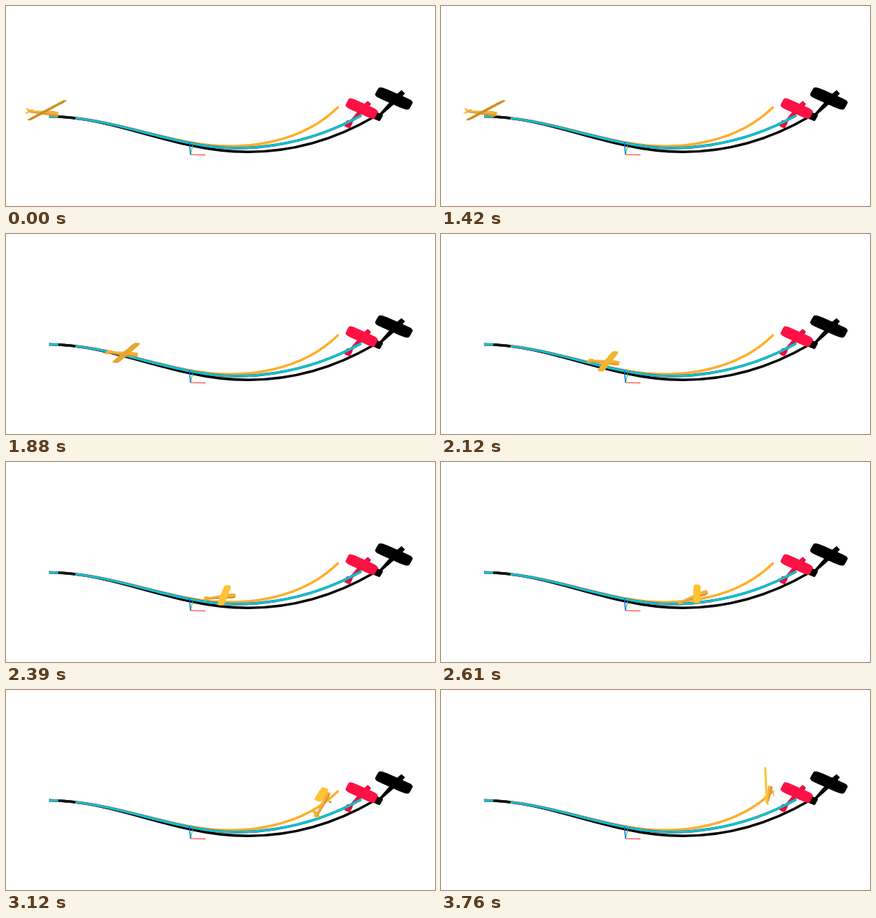
Recreate the animation shown at these times as an HTML page with a canvas. Size 600 px wide and 280 px high, loop 4.51 s.

```html
<!DOCTYPE html>
<html lang="en">
<head>
<meta charset="utf-8">
<style>
  html, body { margin: 0; width: 100%; height: 100%; overflow: hidden; background: #fff; }
  canvas { display: block; }
</style>
</head>
<body>
<canvas id="stage" width="600" height="280"></canvas>
<script>
const ctx = document.getElementById('stage').getContext('2d');
const LOOP = 4510, START = 1420, FLIGHT = 2130;

const blackTrack = new Path2D('M60 154.5 C130 155 190 181 258 195 C345 214.5 432 203.5 515 155');
const cyanTrack = new Path2D('M60 154.5 C130 155 190 179 258 192 C332 208 420 196 497 153');
const orangeTrack = new Path2D('M60 154.5 C130 155 190 178 258 191 C340 206 418 188 465 141');

// Screen vectors: wing centre, half span, half chord, tail to cabin, cabin to wing
const blackPlane = {
  center: [542.5, 129.5], span: [-24, -10.5], chord: [4, -7], body: [24, -24], rise: [-2, -1.5],
  girth: 4, wing: '#000', skin: '#000', shade: '#000'
};
const redPlane = {
  center: [497.5, 143.5], span: [-20.5, -9.3], chord: [3.5, -6.8], body: [20, -21], rise: [-1.5, -1],
  girth: 3.8, wing: '#ff1044', skin: '#f01040', shade: '#c80e3a'
};

function line(path, color, width = 3.4) {
  ctx.strokeStyle = color;
  ctx.lineWidth = width;
  ctx.stroke(path);
}

function fill(points, color) {
  ctx.beginPath();
  points.forEach(p => ctx.lineTo(...p));
  ctx.fillStyle = color;
  ctx.fill();
}

function drawPlane({ center, span, chord, body, rise, girth, wing, skin, shade }) {
  const at = (f, s, u, k = 0) => center.map((c, i) =>
    c + f * body[i] + s * span[i] + u * rise[i] + k * chord[i]);
  const length = Math.hypot(...body);
  const side = (f, w) => {
    const [x, y] = at(f, 0, -1);
    return [x - body[1] / length * w, y + body[0] / length * w];
  };
  // Rounded panel: a superellipse across span and chord
  const panel = (f, u, s, k, color) => {
    const round = v => Math.sign(v) * Math.abs(v) ** .35;
    const points = Array.from({ length: 48 }, (_, i) => {
      const a = i / 24 * Math.PI;
      return at(f, s * round(Math.cos(a)), u, k * round(Math.sin(a)));
    });
    fill(points, color);
  };

  panel(.2, -2, .13, .35, shade);
  panel(-1, -1, .2, .65, skin);
  fill([at(-1.08, 0, -1), at(-1.06, 0, .3), at(-.75, 0, -1)], skin);
  const profile = [[-1, 1.4], [-.2, girth * .8], [.2, girth], [.46, girth * .8]];
  const left = profile.map(([f, w]) => side(f, w));
  const right = profile.map(([f, w]) => side(f, -w)).reverse();
  fill([...left, ...right], skin);
  fill([...left, side(.4, girth * .3), side(-1, .4)], shade);
  panel(0, 0, 1, 1, wing);
}

function flyingPlane(t) {
  const p = Math.min(1, Math.max(0, (t - START) / FLIGHT));
  const ramp = (from, to) => Math.min(1, Math.max(0, (p - from) / (to - from)));
  const smooth = (from, to) => ramp(from, to) ** 2 * (3 - 2 * ramp(from, to));

  const travel = Math.sin(Math.PI / 2 * Math.min(1, p / .93) ** 1.2);
  const x = (t < START ? 57.5 : 62.5) + 392 * travel;
  const y = 146 + 76 * travel - 88.5 * travel ** 5.5;
  const climb = (85 * smooth(.3, 1) - 5) * Math.PI / 180;
  const length = 28 - 13 * ramp(.75, 1);
  const bank = ramp(.66, .8), roll = smooth(.8, 1), light = ramp(0, .45);

  return {
    center: [x, y],
    span: [26 - 30 * ramp(0, .66) + 10 * bank - 7 * roll, -14 + 5 * ramp(.5, .8) - 17 * roll],
    chord: [3 + 2 * ramp(0, .2) - 3.5 * roll, .4 + 1.4 * bank - 1.4 * roll],
    body: [length * Math.cos(climb), -length * Math.sin(climb)],
    rise: [-3 - 2 * bank, -4 + 2.5 * ramp(0, .2) - 6 * bank],
    girth: 3.4,
    wing: `rgb(${205 + 50 * light}, ${142 + 53 * light}, ${34 + 20 * light})`,
    skin: '#f4b03a',
    shade: '#d9962b'
  };
}

function draw() {
  const t = performance.now() % LOOP;
  ctx.clearRect(0, 0, 600, 280);
  line(blackTrack, '#000');
  drawPlane(blackPlane);
  drawPlane(redPlane);
  line(orangeTrack, '#ffae2b');
  line(cyanTrack, '#a01c5a', 3.6);
  line(cyanTrack, '#00c3cf', 3.2);
  line(new Path2D('M73 155 Q85 155.4 97 157'), '#0a1416');
  line(new Path2D('M258 208 L279 208.5'), '#ff2a1a', 1.2);
  line(new Path2D('M258 208 L261 195'), '#20e030', 1.2);
  line(new Path2D('M258 208 L256.5 191'), '#1060ff', 1.4);
  drawPlane(flyingPlane(t));
  requestAnimationFrame(draw);
}
draw();
</script>
</body>
</html>
```
